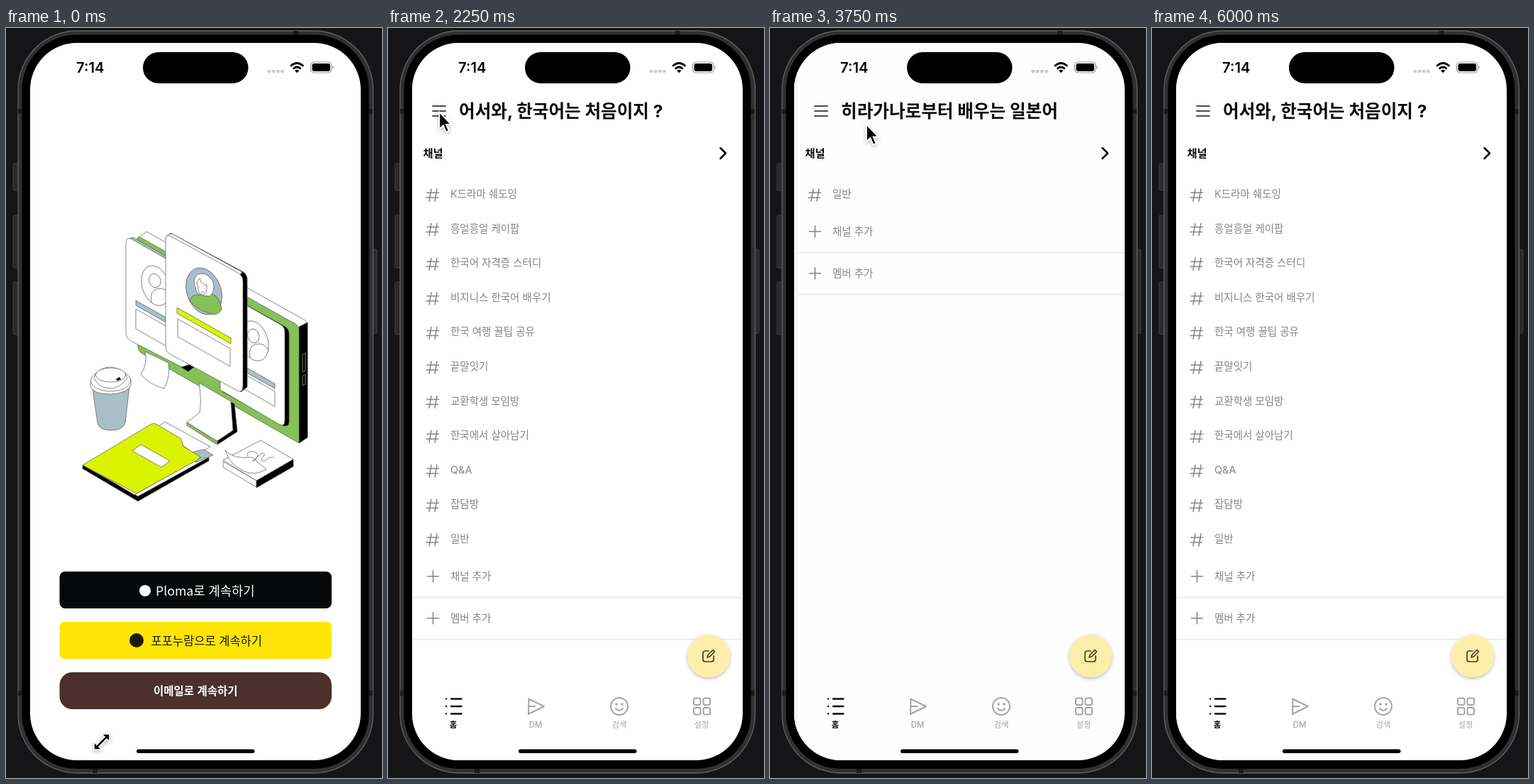
These frames come from a looping animation (530x1057 px, 7.15 s). An HTML page:

```html
<!DOCTYPE html>
<html lang="ko">
<head>
<meta charset="utf-8">
<style>
html, body { margin: 0; width: 100%; height: 100%; overflow: hidden; background: #151517; }
svg { display: block; width: 530px; height: 1057px; }
text { font-family: Inter, "Noto Sans CJK KR", "Noto Sans CJK", sans-serif; white-space: pre; }
.cjk { font-family: "Noto Sans CJK KR", "Noto Sans CJK", sans-serif; }
.line { fill: none; stroke-linecap: round; stroke-linejoin: round; }
.art { stroke: #555; stroke-width: .7; stroke-linejoin: round; }
</style>
</head>
<body>
<svg id="stage" viewBox="0 0 530 1057" xmlns="http://www.w3.org/2000/svg"></svg>
<script>
const LOOP = 7150, STEP = 125, LAST_CHANGE = 6000;
const SCREEN = { x: 34, y: 21, w: 466, h: 1011 };
const DRAWER_WIDTH = 373;
const PUSH = 1501, OPEN_1 = 2464, CLOSE_1 = 3468, OPEN_2 = 4553, CLOSE_2 = 5406;

const text = (x, y, s, size, fill = '#0b0b0b', weight = 400, extra = '') =>
  `<text x="${x}" y="${y}" font-size="${size}" fill="${fill}" font-weight="${weight}" ${extra}>${s.replace('&', '&amp;')}</text>`;
const rect = (x, y, w, h, fill, rx = 0, extra = '') =>
  `<rect x="${x}" y="${y}" width="${w}" height="${h}" rx="${rx}" fill="${fill}" ${extra}/>`;
const circle = (x, y, r, fill, extra = '') => `<circle cx="${x}" cy="${y}" r="${r}" fill="${fill}" ${extra}/>`;
const path = (d, fill, extra = '') => `<path d="${d}" fill="${fill}" ${extra}/>`;
const line = (d, color, width = 1.6) => `<path class="line" d="${d}" stroke="${color}" stroke-width="${width}"/>`;
const group = (id, body, extra = '') => `<g id="${id}" ${extra}>${body}</g>`;
const fullScreen = (fill, extra = '') => rect(SCREEN.x, SCREEN.y, SCREEN.w, SCREEN.h, fill, 0, extra);
const plus = (x, y) => line(`M${x - 8} ${y}h16M${x} ${y - 8}v16`, '#858585');

// Isometric band: a left edge of height h pushed along the drawing's x axis.
const band = (x, y, w, h, fill) => path(`M${x} ${y}l${w} ${w * .565}v${h}l${-w} ${-w * .565}z`, fill);

function portrait(x, y) {
  return `<g transform="translate(${x} ${y}) rotate(-18)" fill="#fff">
    <ellipse rx="19" ry="29"/><ellipse cx="1" cy="-7" rx="8" ry="10"/>
    <path d="M-13 21Q-11 4 1 5Q14 7 15 19" fill="none"/></g>`;
}

function illustration() {
  const green = '#85c155', blue = '#a9bfc8', lime = '#daf400';
  const monitor =
    path('M185 297L198 287L422 412L425 416V577L413 585L400 430z', '#fff') +
    path('M413 421L425 415V577L413 585z', '#000') +
    path('M185 299Q185 292 191 296L408 417Q413 420 413 427V585L191 458Q186 455 186 448z', green) +
    path('M418 460l4-2v25l-4 2zM418 490l4-2v14l-4 2z', 'none', 'style="stroke:#aaa"');
  const stand =
    path('M272 500Q276 523 273 542L255 556L297 582L325 568L320 528z', '#fff') +
    path('M317 527L322 530L326 569L298 587V582L320 567z', '#000') +
    path('M255 556L297 582V587L255 560z', green);
  const rightCard =
    path('M306 372L392 420Q399 424 399 431V556Q398 563 390 560L306 513z', '#000') +
    path('M302 370L387 418Q393 421 393 429V553Q393 562 386 559L302 510z', '#fff') +
    portrait(350, 441) + band(306, 460, 73, 7, blue) + band(306, 471, 73, 21, '#fff');
  const leftCard =
    path('M173 297L179 295L266 345V476L256 484L245 477z', blue) +
    path('M169 304Q169 293 178 298L260 345V477Q258 484 250 479L176 441Q169 437 169 429z', '#fff') +
    path('M247 478L266 472L265 478L257 484z', '#000') +
    portrait(211, 363) + band(183, 384, 80, 7, blue) + band(183, 396, 80, 28, '#fff');
  const frontCard =
    path('M226 295L232 289L333 343Q340 347 340 354V506L331 513L320 500z', '#000') +
    path('M225 299Q225 290 234 290L333 344L328 350z', '#fff') +
    path('M225 299Q225 289 233 294L327 345Q334 349 334 357V504Q334 515 326 511L232 460Q225 456 225 449z', '#fff') +
    `<g transform="translate(279 371) rotate(-20)"><ellipse rx="24" ry="34" fill="${blue}"/></g>` +
    path('M259 384Q263 373 273 377L291 375Q302 379 304 397Q297 407 287 402Q268 397 259 384z', green) +
    path('M267 365C259 344 282 341 289 354C295 359 294 376 286 378Q266 377 267 365z', '#fff') +
    path('M269 358Q271 378 278 376Q284 374 283 362Q276 363 273 353z', '#fff') +
    path('M272 365h1M279 367h1M275 372q2 1 4 0', 'none') +
    band(241, 394, 76, 8, lime) + band(242, 410, 74, 25, '#fff');
  const sheet = path('M196 456Q200 474 190 488Q201 502 223 508Q232 492 229 472z', '#fff');
  const cup =
    path('M122 508L129 556Q131 567 148 567Q165 567 168 556L174 506z', blue) +
    path('M119 499V505Q123 516 147 516Q172 515 176 503V495z', '#fff') +
    '<ellipse cx="147.500" cy="497" rx="28" ry="15" fill="#fff"/>' +
    path('M124 493L127 486Q146 470 168 486L171 493Q161 508 147 508Q130 507 124 493z', '#fff') +
    '<ellipse cx="147.500" cy="489" rx="21" ry="10" fill="#fff"/>' +
    path('M155 495l5-3 2 3-5 2z', '#000');
  const folder =
    path('M214 562L224 555L288 590L268 602z', '#fff') +
    path('M253 600L279 594L292 602L268 612z', blue) +
    path('M108 616L186 660L286 605V610L186 667L108 621z', '#000') +
    path('M112 616L183 655L275 605L181 658z', '#fff') +
    path('M108 616L205 558Q209 556 213 559L247 579L250 590L272 603Q275 605 271 608L184 656z', lime) +
    path('M190 587L231 610L219 619L178 596z', '#fff');
  const pad =
    path('M306 609L359 581L405 608L353 638z', '#fff') +
    path('M306 611L353 638V647L306 619z', '#fff') +
    path('M353 638L405 608V618L353 648z', '#000') +
    path('M309 595Q319 608 347 605L367 622Q350 632 334 624Q315 615 309 595z', '#fff') +
    path('M341 604Q338 595 349 597Q359 600 352 608Q342 615 354 605Q361 596 365 601Q355 612 365 610Q370 604 378 605', 'none');
  return `<g class="art">${monitor + stand + rightCard + sheet + leftCard + frontCard + cup + folder + pad}</g>`;
}

function loginPage() {
  return fullScreen('#fff') + illustration() +
    rect(75.5, 766, 383.500, 52, '#060809', 8) + circle(196, 793, 8, '#fff') +
    text(211, 799.5, 'Ploma로 계속하기', 17.7, '#fff', 500, 'class="cjk"') +
    rect(75.5, 837, 383.500, 52, '#ffe505', 7) + circle(184, 863, 10, '#1c1a0b') +
    text(204.5, 869.5, '포포누람으로 계속하기', 16.5, '#17150a', 500, 'class="cjk"') +
    rect(75.5, 908, 383.500, 52, '#4b302b', 18) +
    text(208, 939.5, '이메일로 계속하기', 15.5, '#fff', 700, 'class="cjk"');
}

const hash = y => line(`M55 ${y - 3}h16.500M54 ${y + 4}h16.500M61 ${y - 8}l-3 17M69 ${y - 8}l-3 17`, '#858585', 1.5);

function channelView(id, title, channels) {
  const rowY = i => 234 + i * 48.6;
  const last = rowY(channels.length - 1);
  const rows = channels.map((name, i) => hash(rowY(i) + 1) + text(88, rowY(i) + 5, name, 14.5, '#858585')).join('');
  const action = (y, label) => plus(63.5, y) + text(88, y + 5, label, 14.5, '#858585');
  const rule = y => rect(34, y, 466, 2, '#ececec');
  return group(id, text(100, 126.3, title, 24.6, '#0b0b0b', 700) + rows +
    action(last + 52.7, '채널 추가') + rule(last + 81.5) + action(last + 111.7, '멤버 추가') + rule(last + 140.5));
}

function homePage() {
  const gray = '#a6a6a6';
  const label = (x, s, color, weight) => text(x, 986, s, 11.4, color, weight, 'text-anchor="middle"');
  const cell = (x, y) => rect(x, y, 9.5, 9.5, 'none', 2, `stroke="${gray}" stroke-width="2"`);
  const tabs =
    line('M82 945.500h.1M82 956h.1M82 966.500h.1M89 945.500h14.500M89 956h14.500M89 966.500h14.500', '#0b0b0b', 2.3) + label(92, '홈', '#0b0b0b', 700) +
    line('M198 945.500L220 956L198 967L198.500 945.500M198.500 956h9', gray, 2) + label(208, 'DM', gray, 500) +
    circle(326, 956, 12, 'none', `stroke="${gray}" stroke-width="2"`) + circle(322, 953, 1.8, gray) + circle(330, 953, 1.8, gray) +
    line('M321 959q5 6 10 0', gray, 2) + label(326, '검색', gray, 500) +
    cell(431, 944.5) + cell(444.5, 944.5) + cell(431, 958) + cell(444.5, 958) + label(442, '설정', gray, 500);
  const fab = circle(452, 885, 30, '#fdefab', 'filter="url(#soft)"') +
    line('M452 878h-5q-3 0-3 3v9q0 3 3 3h9q3 0 3-3v-5M450 887l1-3.500l7-7l2.500 2.500l-7 7z', '#4b3d14', 1.7);
  return fullScreen('#fff') +
    line('M63 110h18M63 117h18M63 124h18', '#111', 1.7) +
    text(49.5, 182, '채널', 15.3, '#0b0b0b', 700) + line('M468.500 169l7.500 7.500l-7.500 7.500', '#0b0b0b', 2.5) +
    channelView('korean', '어서와, 한국어는 처음이지 ?', ['K드라마 쉐도잉', '흥얼흥얼 케이팝', '한국어 자격증 스터디', '비지니스 한국어 배우기',
      '한국 여행 꿀팁 공유', '끝말잇기', '교환학생 모임방', '한국에서 살아남기', 'Q&A', '잡담방', '일반']) +
    channelView('japanese', '히라가나로부터 배우는 일본어', ['일반']) + tabs + fab;
}

// Thumbnails on a 52 x 52 tile.
const thumbs = [
  rect(0, 0, 52, 52, '#6aa5dc') + path('M0 14q12-8 22 4t30-3v22H0z', '#dfeaf3') + rect(0, 42, 52, 10, '#71963a') +
    path('M0 38q10-5 20 0h12q10-5 20 0v6H0z', '#3f5a30') + path('M26 3l2 18l4 12l6 13h-6q-6-10-12 0h-6l6-13l4-12z', '#4d4740'),
  rect(0, 0, 52, 52, '#efd9b0') + path('M5 14Q26 0 48 14V38H5z', '#ee9150') + path('M20 38V26l4-6l3 6l4-6l4 18z', '#a9502e') +
    circle(7, 8, 5, '#3f8a4a') + circle(45, 9, 5, '#d8433a') + path('M8 24l7 18H4z', '#cf3030') +
    rect(37, 37, 12, 10, '#20924d', 2) + circle(13, 45, 4, '#e6b834') + line('M13 6q4-4 8 0t8 0t8-1', '#fff4d0', 2),
  rect(0, 0, 52, 52, '#7d95a8') + path('M0 26Q16 14 32 21T52 18V52H0z', '#706c4c') + path('M0 39Q15 31 30 38T52 35V52H0z', '#484d30') +
    line('M7 27v3M11 26.500v3M15 27v3M19 27.500v3M23 28v3M27 28v3M31 28.500v3M35 28.500v3', '#eee', 2),
  rect(0, 0, 52, 52, '#8fe5ec') + ['한국어', '배우기'].map((s, i) =>
    text(26, 25 + i * 15, s, 14, '#fff', 700, 'text-anchor="middle" stroke="#4c5960" stroke-width="1.600" paint-order="stroke"')).join('') +
    line('M40 5l4 9M43 6v8', '#a97748', 2),
  rect(0, 0, 52, 52, '#4c84c2') + path('M0 25L18 10L40 28V52H0z', '#c9d5e2') + path('M26 38V27l-3-2l8-6l2-7l8-3l6 6l-1 5l6 6v13z', '#eceef0') +
    path('M28 20l6-5h9l7 6zM23 27l8-4h16l6 5z', '#69747e') + path('M0 40q7-9 15-3t14-2t12 4t11-1V52H0z', '#d5a5b2') +
    path('M0 47q10-6 20-1t32 0v6H0z', '#b8899a')
];

function drawer() {
  const names = ['Tous les Jour Français', 'Hola! 낭만 가득 스페인어', '영어 회화 마스터', '어서와, 한국어는 처음이지 ?', '히라가나로부터 배우는 일본어'];
  const items = names.map((name, i) => {
    const y = 158.5 + i * 85.4;
    const dots = [350.5, 359, 367.5].map(x => circle(x, y + 36, 2.5, '#0b0b0b')).join('');
    return `<g transform="translate(58 ${y + 10})" clip-path="url(#tile)">${thumbs[i]}</g>` +
      text(120, y + 32, name, i ? 14.5 : 15.2, '#0b0b0b', 700) + text(120, y + 50.5, '24.12.16', 14.3, '#858585') + dots;
  }).join('');
  return rect(4, 21, 30 + DRAWER_WIDTH, 1011, '#f4f4f4', 19) +
    text(53, 125.5, '플레이그라운드', 24.6, '#0b0b0b', 700) +
    rect(48, 0, 345, 71.5, '#fff', 9, 'id="selected"') + items +
    plus(64, 918) + text(88.5, 923.5, '플레이그라운드 추가', 14.5, '#858585') +
    circle(65, 967, 9.5, 'none', 'stroke="#858585" stroke-width="1.500"') +
    text(65, 971.5, '?', 12, '#858585', 500, 'text-anchor="middle"') + text(90.5, 972.5, '도움말', 14.5, '#858585');
}

function phone() {
  const button = (x, y, h) => rect(x, y, 8, h, '#29292b', 1.5, 'stroke="#414143"');
  return rect(0, 0, 530, 1057, '#151517') +
    button(10, 191, 38) + button(10, 264, 74) + button(10, 358, 74) + button(515, 312, 118) +
    rect(17, 4, 500.500, 1046, '#303032', 83, 'stroke="#626264" stroke-width="1.300"') +
    rect(17, 114, 6, 7, '#1b1b1c') + rect(17, 934, 6, 7, '#1b1b1c') + rect(511, 114, 6, 7, '#1b1b1c') +
    rect(511, 934, 6, 7, '#1b1b1c') + rect(405, 4, 7, 6, '#1b1b1c') + rect(122, 1044, 7, 6, '#1b1b1c') +
    rect(22.5, 9.5, 489, 1034.500, '#000', 77);
}

function statusBar() {
  const dots = [0, 1, 2, 3].map(i => rect(368.5 + i * 6.2, 59, 4.8, 4.2, '#000', 1.4, 'opacity=".2"')).join('');
  return rect(193, 34, 148.500, 44, '#000', 22) + text(99, 63, '7:14', 20.2, '#000', 600) + dots +
    line('M402 53q8.200-7 16.400 0', '#000', 2.9) + line('M405.500 57q4.700-4 9.400 0', '#000', 2.7) + path('M407 60q3.200-2.500 6.400 0l-3.200 3.200z', '#000') +
    rect(429.5, 48, 29.500, 15, 'none', 4.8, 'stroke="#000" stroke-opacity=".4" stroke-width="1.200"') +
    rect(431.5, 50, 25.500, 11, '#000', 3) + path('M460.500 53.300q2.500 2.200 0 4.400z', '#000', 'opacity=".5"') +
    rect(184, 1016.5, 166.500, 5.500, '#000', 2.7);
}

const pointers = group('resize', path('M-11 11V0L-7 4L4 -7L0 -11H11V0L7 -4L-4 7L0 11z', '#000', 'stroke="#fff" stroke-width="1.600"'), 'filter="url(#soft)"') +
  group('arrow', path('M1 1V25L6.500 20L10.500 29.500L14.500 27.500L10.500 18.500H17.500z', '#000', 'stroke="#fff" stroke-width="1.800"'), 'filter="url(#soft)"');

document.getElementById('stage').innerHTML =
  `<defs>
    <clipPath id="glass">${rect(SCREEN.x, SCREEN.y, SCREEN.w, SCREEN.h, '#000', 66)}</clipPath>
    <clipPath id="tile">${rect(0, 0, 52, 52, '#000', 8)}</clipPath>
    <filter id="soft" x="-50%" y="-50%" width="200%" height="200%"><feDropShadow dx="0" dy="2" stdDeviation="2.500" flood-opacity=".28"/></filter>
  </defs>` + phone() +
  `<g clip-path="url(#glass)">` + group('login', loginPage()) + fullScreen('#000', 'id="shade"') +
  group('home', homePage()) + fullScreen('#000', 'id="scrim"') + group('drawer', drawer()) + '</g>' + statusBar() + pointers;

const el = Object.fromEntries(['login', 'shade', 'home', 'korean', 'japanese', 'scrim', 'drawer', 'selected', 'resize', 'arrow']
  .map(id => [id, document.getElementById(id)]));

// Critically damped spring: the share of the way still to go.
function remaining(ms) {
  const x = Math.max(0, ms) * .02236;
  return (1 + x) * Math.exp(-x);
}

function drawerProgress(t) {
  if (t < OPEN_1) return 0;
  if (t < CLOSE_1) return 1 - remaining(t - OPEN_1);
  if (t < OPEN_2) return remaining(t - CLOSE_1);
  if (t < CLOSE_2) return 1 - remaining(t - OPEN_2);
  return remaining(t - CLOSE_2);
}

// Pointer path: time, x, y.
const route = [
  [0, 135, 1006], [125, 140, 1000], [750, 240, 945], [1375, 245, 938], [1500, 232, 800], [1625, 176, 341], [1875, 85, 135],
  [2000, 70, 118], [2375, 72, 117], [2500, 90, 126], [2625, 138, 158], [2875, 175, 430], [3125, 190, 528], [3375, 190, 528],
  [3500, 177, 324], [3625, 152, 200], [3750, 135, 135], [4000, 72, 139], [4250, 72, 139], [4500, 72, 120], [4625, 115, 260],
  [4750, 168, 437], [5375, 168, 437], [5625, 180, 680], [5875, 190, 1010], [6000, 195, 1090]
];

function pointerAt(t) {
  const i = Math.max(1, route.findIndex(key => key[0] >= t));
  const [t0, x0, y0] = route[i - 1], [t1, x1, y1] = route[i];
  const k = (t - t0) / (t1 - t0);
  return `translate(${x0 + (x1 - x0) * k} ${y0 + (y1 - y0) * k})`;
}

const show = (node, on) => node.setAttribute('display', on ? 'inline' : 'none');
const slide = (node, x) => node.setAttribute('transform', `translate(${x.toFixed(2)} 0)`);

function draw(ms) {
  const t = Math.min(LAST_CHANGE, Math.floor(ms / STEP) * STEP);
  const left = remaining(t - PUSH);
  slide(el.login, -.3 * SCREEN.w * (1 - left));
  slide(el.home, SCREEN.w * left);
  el.shade.setAttribute('opacity', .1 * (1 - left));

  const open = drawerProgress(t);
  slide(el.drawer, -DRAWER_WIDTH * (1 - open));
  show(el.drawer, open > .001);
  el.scrim.setAttribute('opacity', .52 * open);
  el.selected.setAttribute('y', 158.5 + 85.4 * (t < OPEN_2 ? 3 : 4));

  const japanese = t >= CLOSE_1 && t < CLOSE_2;
  show(el.japanese, japanese);
  show(el.korean, !japanese);

  show(el.resize, t < 250);
  show(el.arrow, t >= 250 && t < LAST_CHANGE);
  (t < 250 ? el.resize : el.arrow).setAttribute('transform', pointerAt(t));
}

const start = performance.now();
function tick() {
  draw((performance.now() - start) % LOOP);
  requestAnimationFrame(tick);
}
tick();
</script>
</body>
</html>
```
